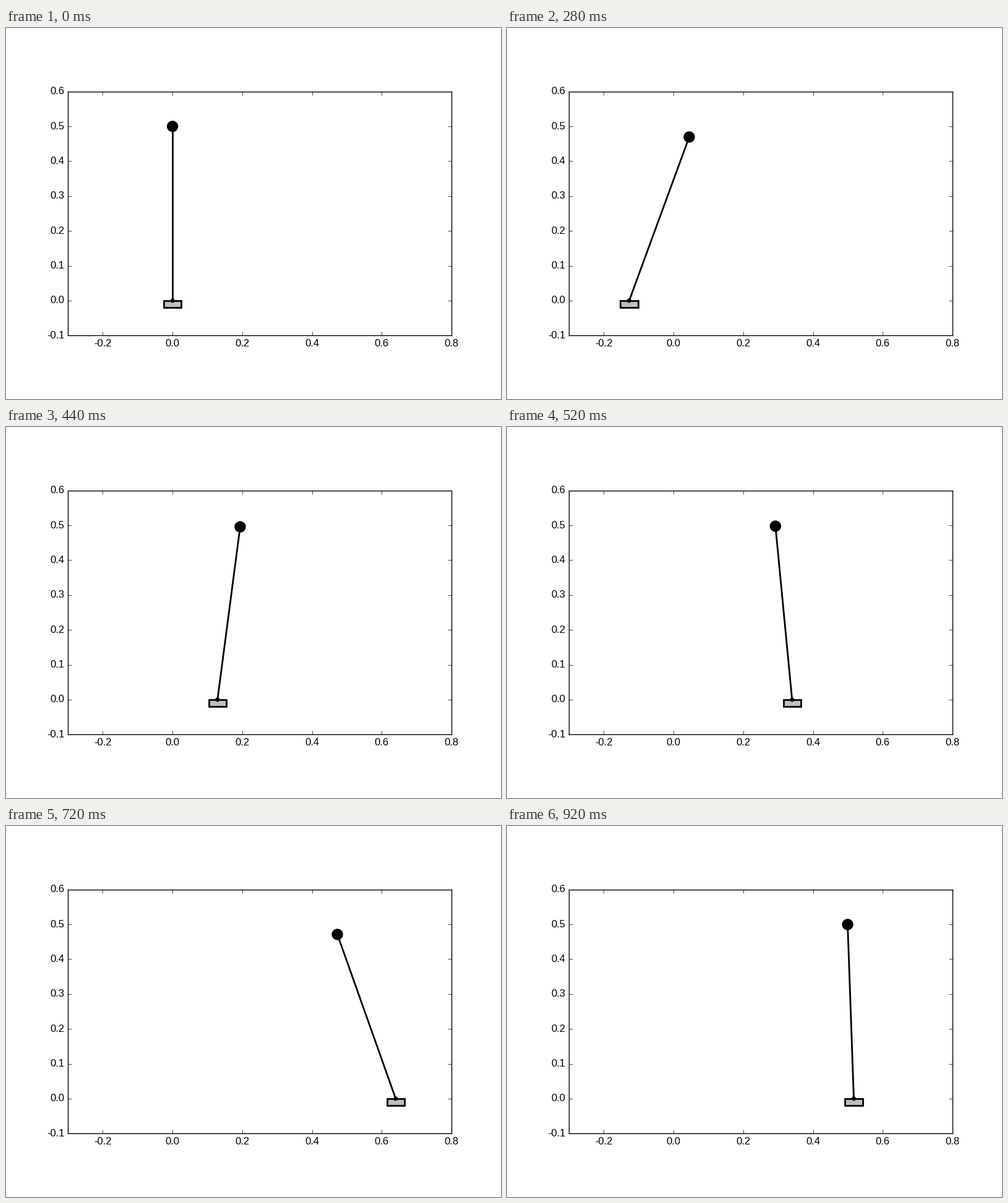
Recreate the animation shown at these times as a matplotlib script. Size 800 px wide and 600 px high, loop 0.96 s.

```python
import numpy as np
import matplotlib.pyplot as plt
from matplotlib.animation import FuncAnimation
from matplotlib.patches import Circle, Rectangle

FRAMES, INTERVAL = 24, 40
ROD = 0.5
CART_W, CART_H = 0.05, 0.02

plt.rcParams.update({
    "font.family": "Liberation Sans",
    "font.size": 12,
    "axes.linewidth": 1.0,
    "axes.unicode_minus": False,
    "ytick.alignment": "center",
})
for side in ("xtick", "ytick"):
    plt.rcParams.update({
        f"{side}.direction": "in",
        f"{side}.major.size": 4,
        f"{side}.major.width": 0.5,
        f"{side}.major.pad": 4,
        f"{side}.labelsize": 12,
    })


def rest_to_rest(t, y, n):
    """Cubic spline through (t, y), at rest at both ends, sampled at 0..n-1."""
    t, y = np.array(t, float), np.array(y, float)
    h = np.diff(t)
    slope = np.diff(y) / h
    m = len(t)
    a, b = np.eye(m), np.zeros(m)
    for i in range(1, m - 1):
        a[i, i - 1:i + 2] = h[i], 2 * (h[i - 1] + h[i]), h[i - 1]
        b[i] = 3 * (h[i] * slope[i - 1] + h[i - 1] * slope[i])
    v = np.linalg.solve(a, b)

    s = np.arange(n)
    k = np.clip(np.searchsorted(t, s, side="right") - 1, 0, m - 2)
    u, step = (s - t[k]) / h[k], h[k]
    return ((1 + 2 * u) * (1 - u) ** 2 * y[k] + u * (1 - u) ** 2 * step * v[k]
            + u ** 2 * (3 - 2 * u) * y[k + 1] - u ** 2 * (1 - u) * step * v[k + 1])


# The cart backs away, lets the bob fall forward, overtakes it and settles.
KNOTS = [0, 1.2, 4, 6.2, 9, 11, 14, 15, 18, 20.2, 23, 24.2]
cart_x = rest_to_rest(KNOTS, [0, -0.017, -0.1066, -0.140, -0.034, 0.129,
                              0.438, 0.517, 0.640, 0.6066, 0.517, 0.5], FRAMES)
bob_x = rest_to_rest(KNOTS, [0, 0.0007, 0.0053, 0.0273, 0.110, 0.194,
                             0.339, 0.380, 0.4727, 0.4947, 0.4993, 0.5], FRAMES)
bob_y = np.sqrt(ROD ** 2 - (bob_x - cart_x) ** 2)

fig = plt.figure(figsize=(8, 6), dpi=100, facecolor="white")
ax = fig.add_axes([0.125, 0.1, 0.775, 0.8])
ax.set_aspect("equal")
ax.set_xlim(-0.3, 0.8)
ax.set_ylim(-0.1, 0.6)
ax.set_xticks(np.arange(-2, 9, 2) / 10)
ax.set_yticks(np.arange(-1, 7) / 10)
ax.xaxis.set_major_formatter("{x:.1f}")
ax.yaxis.set_major_formatter("{x:.1f}")
ax.tick_params(top=True, right=True)

cart = ax.add_patch(Rectangle((0, -CART_H), CART_W, CART_H, fc="0.75",
                              ec="black", lw=2, zorder=2))
rod, = ax.plot([], [], color="black", lw=2, zorder=3)
joint = ax.add_patch(Circle((0, 0), 0.005, fc="black", ec="black", lw=1, zorder=4))
bob = ax.add_patch(Circle((0, ROD), 0.015, fc="black", ec="black", lw=1, zorder=4))


def draw(i):
    x, bx, by = cart_x[i], bob_x[i], bob_y[i]
    cart.set_x(x - CART_W / 2)
    rod.set_data([x, bx], [0, by])
    joint.center = x, 0
    bob.center = bx, by
    return cart, rod, joint, bob


anim = FuncAnimation(fig, draw, frames=FRAMES, interval=INTERVAL,
                     repeat=True, repeat_delay=0, blit=False)
plt.show()
```
